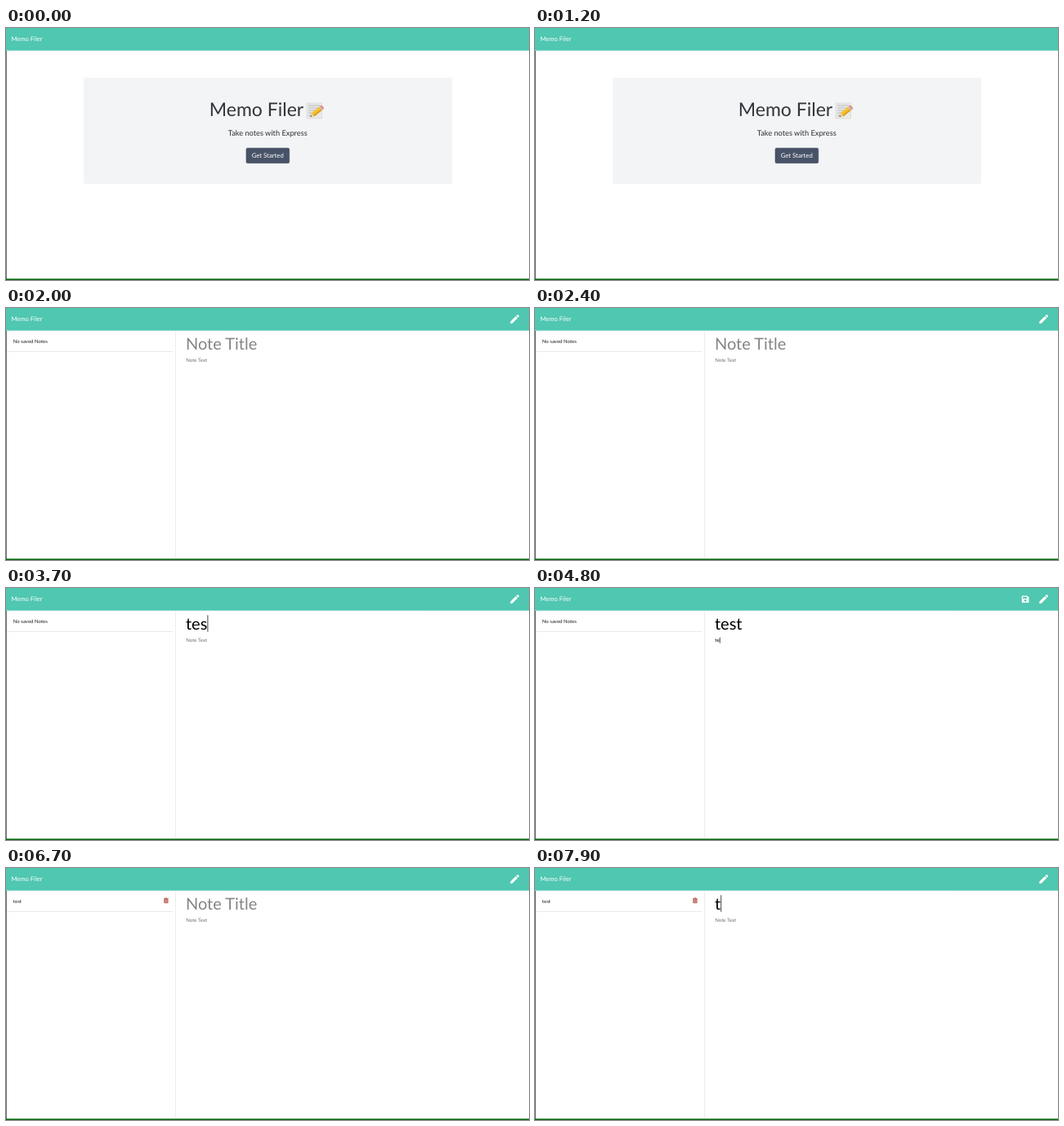
An HTML page for the animation above (8 s loop, 640 px wide and 309 px high).

```html
<!DOCTYPE html>
<html lang="en">
<head>
<meta charset="utf-8">
<title>Memo Filer</title>
<style>
  html, body { margin: 0; width: 100%; height: 100%; overflow: hidden; background: #fff; }
  svg { display: block; width: 100vw; height: 100vh; }
  text { font-family: Lato, sans-serif; text-rendering: geometricPrecision; white-space: pre; }
  .mid { text-anchor: middle; }
  .big { font-size: 20px; }
  .small { font-size: 6.05px; }
</style>
</head>
<body>
<svg viewBox="0 0 640 309" preserveAspectRatio="none">
  <rect width="640" height="309" fill="#fff"/>
  <rect width="640" height="27.7" fill="#50c7b1"/>
  <text x="6.4" y="16.4" font-size="7.6" fill="#fff">Memo Filer</text>

  <g id="home">
    <rect x="95" y="61" width="451" height="130" fill="#f2f4f6"/>
    <text class="mid" x="306.5" y="108.3" font-size="23" fill="#32363a">Memo Filer</text>
    <g id="memo">
      <path d="M368 92H386.5V111H368Z" fill="#e9e9e7" stroke="#d3d3d1" stroke-width=".6"/>
      <path d="M370 95H384M370 98H383M370 101H380M370 104H377M370 107H373" stroke="#a5a8ab" stroke-width=".7"/>
      <g transform="translate(372.3 109) rotate(-39)">
        <path d="M0 0L4.5 -2.8V2.8Z" fill="#e8c79a"/>
        <path d="M0 0L1.7 -1.1V1.1Z" fill="#444"/>
        <path d="M4.5 -2.8H16V2.8H4.5Z" fill="#f5c22d"/>
        <path d="M4.5 .9H16V2.8H4.5Z" fill="#dc9d20"/>
        <path d="M16 -2.8H17.5V2.8H16Z" fill="#b9bcc0"/>
        <path d="M17.5 -2.8H18.6Q20 -2.8 20 -1.4V1.4Q20 2.8 18.6 2.8H17.5Z" fill="#e68a85"/>
      </g>
    </g>
    <text class="mid" x="320.2" y="132" font-size="9.25" fill="#2b2f33">Take notes with Express</text>
    <rect id="button" x="294" y="147.3" width="52.7" height="18.4" rx="1.6"/>
    <text class="mid" x="320.2" y="159.3" font-size="7.75" fill="#fff">Get Started</text>
  </g>

  <g id="notes">
    <rect x="207" y="28" width="1" height="279" fill="#ececec"/>
    <rect x="1" y="53" width="203" height="1" fill="#e9e9e9"/>
    <text id="item" class="small" x="8.8" y="42.9" fill="#1c1f22"></text>
    <g id="trash" fill="none" stroke="#b8615c">
      <path d="M193 37.6H198.8M194.8 36.9H197" stroke-width=".9"/>
      <path d="M193.7 38.4H198.1V42.8H193.7Z" fill="#d39a96" stroke-width=".9"/>
      <path d="M195.2 39.2V42M196.6 39.2V42" stroke-width=".5"/>
    </g>
    <text id="title" class="big" x="220" y="51"></text>
    <text id="body" class="small" x="220.3" y="66.2"></text>
    <rect id="caret" width=".9" fill="#333"/>
    <g id="save">
      <path d="M596.6 9.6H602.4L604.4 11.6V17.2Q604.4 18.1 603.5 18.1H596.6Q595.7 18.1 595.7 17.2V10.5Q595.7 9.6 596.6 9.6Z" fill="#fff"/>
      <path d="M597 10.8H601.9V12.9H597Z" fill="#50c7b1"/>
      <circle cx="600" cy="15.4" r="1.3" fill="#50c7b1"/>
    </g>
    <path transform="translate(615.4 6.4) scale(.6)" fill="#fff"
      d="M3 17.25V21h3.75L17.81 9.94l-3.75-3.75L3 17.25zM20.71 7.04a1 1 0 0 0 0-1.41l-2.34-2.34a1 1 0 0 0-1.41 0l-1.83 1.83 3.75 3.75z"/>
  </g>

  <rect y="28" width=".9" height="280" fill="#5c605e"/>
  <rect y="307.4" width="640" height="1.6" fill="#08680f"/>
</svg>
<script>
  const LOOP = 8000, OPEN = 1900, SAVED = 6400;
  const WORD = "test";
  const titleKeys = [3400, 3600, 3700, 3900];
  const bodyKeys = [4600, 4800, 5000, 5100];
  const secondKeys = [7900];

  // Spans in which the caret is lit
  const titleCaret = [[2800, 3300], [3400, 4300], [7300, 7800], [7900, LOOP]];
  const bodyCaret = [[4300, 5600], [6100, 6200]];

  const el = id => document.getElementById(id);
  const typed = (keys, t) => WORD.slice(0, keys.filter(k => t >= k).length);
  const within = (spans, t) => spans.some(([a, b]) => t >= a && t < b);
  const show = (id, on) => el(id).setAttribute("display", on ? "inline" : "none");

  function setField(id, value, hint, hintColor) {
    el(id).textContent = value || hint;
    el(id).setAttribute("fill", value ? "#000" : hintColor);
  }

  function placeCaret(id, value, y, height) {
    const field = el(id);
    const width = value ? field.getComputedTextLength() : 0;
    const caret = el("caret");
    caret.setAttribute("x", +field.getAttribute("x") + width + .1);
    caret.setAttribute("y", y);
    caret.setAttribute("height", height);
  }

  function drawHome(t) {
    const pressed = t >= 1600;
    const button = el("button");
    button.setAttribute("fill", pressed ? "#37475a" : "#485368");
    button.setAttribute("stroke", pressed ? "#a4afb9" : "#3d4859");
    button.setAttribute("stroke-width", pressed ? 1 : .6);
  }

  function drawNotes(t) {
    const saved = t >= SAVED;
    const title = typed(saved ? secondKeys : titleKeys, t);
    const body = saved ? "" : typed(bodyKeys, t);
    const inTitle = within(titleCaret, t), inBody = within(bodyCaret, t);

    el("item").textContent = saved ? WORD : "No saved Notes";
    show("trash", saved);
    show("save", !saved && t >= 4800);
    setField("title", title, "Note Title", "#858585");
    setField("body", body, "Note Text", "#707070");
    show("caret", inTitle || inBody);
    if (inTitle) placeCaret("title", title, 33.3, 20.4);
    if (inBody) placeCaret("body", body, 60.6, 7);
  }

  function frame(now) {
    const t = now % LOOP;
    const home = t < OPEN;
    show("home", home);
    show("notes", !home);
    if (home) drawHome(t); else drawNotes(t);
    requestAnimationFrame(frame);
  }

  frame(performance.now());
</script>
</body>
</html>
```
